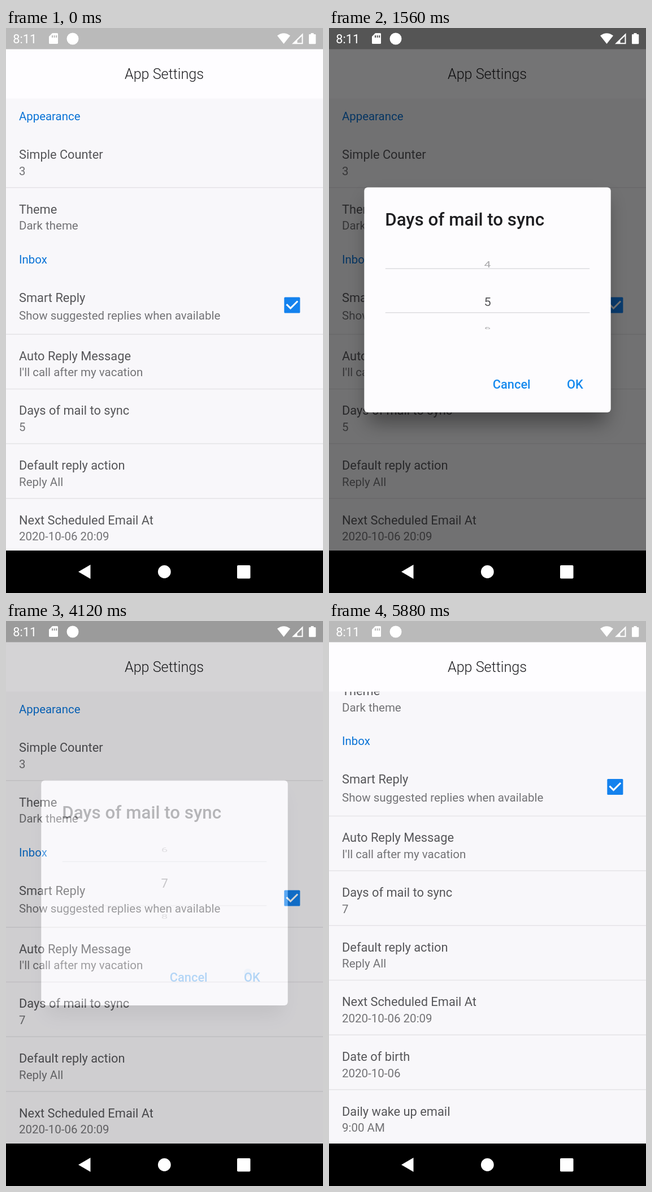
Recreate the animation shown at these times as an HTML page. Size 561 px wide and 998 px high, loop 6 s.

```html
<!DOCTYPE html>
<html lang="en">
<head>
<meta charset="utf-8">
<title>App Settings</title>
<style>
html, body { margin: 0; width: 100%; height: 100%; overflow: hidden; background: #000; }
svg { display: block; width: 100vw; height: 100vh; font-family: Roboto, "Open Sans", sans-serif; }
.name { font-size: 21.82px; fill: #565659; }
.value { font-size: 20.5px; fill: #737376; }
.section { font-size: 20.4px; fill: #0a73d6; }
.button { font-size: 21.82px; font-weight: 500; fill: #168aee; }
.digit { font-size: 21.82px; fill: #555558; text-anchor: middle; }
</style>
</head>
<body>
<svg viewBox="0 0 561 998" xmlns="http://www.w3.org/2000/svg">
  <defs>
    <clipPath id="listClip"><rect y="124.7" width="561" height="798.3"/></clipPath>
    <clipPath id="wheelClip"><rect x="100" y="389" width="361" height="149.5"/></clipPath>
    <filter id="blur" x="-30%" y="-30%" width="160%" height="160%"><feGaussianBlur stdDeviation="17"/></filter>
  </defs>

  <rect width="561" height="923" fill="#f8f7fa"/>
  <g clip-path="url(#listClip)">
    <g id="list"></g>
    <circle id="glow" cx="280.5" r="841" fill="#1482ee"/>
  </g>
  <rect y="37.4" width="561" height="87.3" fill="#fefdff"/>
  <text x="280" y="90" text-anchor="middle" font-size="25.2" font-weight="300" fill="#1f1f22">App Settings</text>
  <rect width="561" height="37.4" fill="#bababa"/>

  <g id="dialog">
    <rect width="561" height="923" fill="#000" opacity=".54"/>
    <rect x="70" y="303" width="421" height="394" rx="6" opacity=".38" filter="url(#blur)"/>
    <rect x="62.3" y="281.4" width="436.4" height="397.6" rx="6.2" fill="#fdfcfe"/>
    <text x="99.2" y="348.5" font-size="31.3" font-weight="500" fill="#1f1f22">Days of mail to sync</text>
    <g id="wheel" clip-path="url(#wheelClip)"></g>
    <path d="M99.7 425H461.3M99.7 502.8H461.3" stroke="#dddde0" stroke-width="1.6"/>
    <circle id="press" cx="428" cy="621" fill="#1482ee" opacity=".14"/>
    <text class="button" x="289.8" y="637.2">Cancel</text>
    <text class="button" x="421" y="637.2">OK</text>
  </g>

  <g fill="#fff">
    <text x="12.3" y="27.2" font-size="21.82">8:11</text>
    <path fill-rule="evenodd" d="M82 9H90.5Q92 9 92 10.500V26.500Q92 28 90.500 28H77.500Q76 28 76 26.500V15ZM81 13V17H83V13ZM84.600 13V17H86.600V13ZM88.200 13V17H90.200V13Z"/>
    <circle cx="118" cy="19" r="10.5"/>
    <path d="M480 13.500Q491.500 4.800 503 13.500L491.500 28Z"/>
    <path fill-rule="evenodd" d="M506 28.200L525.500 9V28.200ZM515.500 26.200H523.500V14.500L515.500 22Z"/>
    <path d="M539.500 9H544.500V11H547Q548.300 11 548.300 12.300V27Q548.300 28.300 547 28.300H537.300Q536 28.300 536 27V12.300Q536 11 537.300 11H539.500Z"/>
  </g>

  <rect y="923" width="561" height="75"/>
  <g fill="#fff">
    <path d="M128 960.500L149.500 948V973Z"/>
    <circle cx="280.3" cy="960.500" r="11.4"/>
    <rect x="409" y="949" width="23.500" height="23.500" rx="1.800"/>
  </g>
</svg>

<script>
const LOOP = 6000, STEP = 40;
const SCROLL_END = 196.5;
const WHEEL = { x: 280.5, y: 463.7, radius: 68.5, angle: 59.5 * Math.PI / 180 };

const $ = id => document.getElementById(id);
const clamp = v => Math.max(0, Math.min(1, v));
const progress = (t, from, to) => clamp((t - from) / (to - from));
const easeOut = (p, power) => 1 - Math.pow(1 - p, power);

function add(parent, tag, attrs, text = "") {
  const el = document.createElementNS("http://www.w3.org/2000/svg", tag);
  for (const key in attrs) el.setAttribute(key, attrs[key]);
  el.textContent = text;
  return parent.appendChild(el);
}
const set = (el, attrs) => { for (const key in attrs) el.setAttribute(key, attrs[key]); };

const list = $("list");
const label = (cls, y, text) => add(list, "text", { class: cls, x: 23, y }, text);
const divider = y => add(list, "rect", { y: y - 0.8, width: 561, height: 1.6, fill: "#e6e5e8" });

// The touch mark lies under the text of its row.
const touch = add(list, "circle", { cx: 300, cy: 662.3 });

function row(y, name, value, gap = 28.6) {
  label("name", y, name);
  return label("value", y + gap, value);
}

label("section", 163.3, "Appearance");
row(230.9, "Simple Counter", "3");
row(327.7, "Theme", "Dark theme");
label("section", 415.7, "Inbox");
row(483.7, "Smart Reply", "Show suggested replies when available", 31.4);
add(list, "rect", { x: 492.3, y: 475.5, width: 28.1, height: 28.1, rx: 1.6, fill: "#1482ee" });
add(list, "path", { d: "M496.500 488.100L503.500 495.100L516.100 482.500", fill: "none", stroke: "#fff", "stroke-width": 3.1 });

const rows = [
  ["Auto Reply Message", "I'll call after my vacation"],
  ["Days of mail to sync", "5"],
  ["Default reply action", "Reply All"],
  ["Next Scheduled Email At", "2020-10-06 20:09"],
  ["Date of birth", "2020-10-06"],
  ["Daily wake up email", "9:00 AM"]
].map(([name, value], i) => {
  const top = 541 + i * 96.65;
  divider(top);
  return row(top + 45.8, name, value);
});
divider(281.8);
const daysValue = rows[1];

const digits = [];
for (let n = 2; n <= 9; n++) {
  digits.push({ n, el: add($("wheel"), "text", { class: "digit", y: 7.7 }, n) });
}

function wheelPosition(t) {
  return 5
    - easeOut(progress(t, 880, 1240), 2.6)
    + easeOut(progress(t, 1400, 1920), 3.4)
    + easeOut(progress(t, 2240, 2480), 2.4)
    + easeOut(progress(t, 2760, 3040), 2.4);
}

function drawWheel(t) {
  const pos = wheelPosition(t);
  for (const { n, el } of digits) {
    const a = (n - pos) * WHEEL.angle;
    const shown = Math.abs(a) < 1.53;
    el.style.display = shown ? "" : "none";
    if (!shown) continue;
    const dy = WHEEL.radius * Math.sin(a);
    const s = 1 / (1 + 0.144 * (1 - Math.cos(a)));
    set(el, {
      transform: `translate(${WHEEL.x} ${WHEEL.y + dy}) scale(${s} ${s * Math.cos(a)})`,
      opacity: 1 - 0.5 * progress(Math.abs(dy), 27, 42)
    });
  }
}

function dialogOpacity(t) {
  if (t < 4120) return easeOut(progress(t, 0, 120), 3.2);
  return t < 4160 ? 0.3 : 0;
}

function render(t) {
  const opacity = dialogOpacity(t);
  $("dialog").style.display = opacity ? "" : "none";
  set($("dialog"), { opacity });
  drawWheel(t);
  set($("press"), { r: t < 3920 ? 0 : 2 + 5 * progress(t, 3920, 4080) });

  const value = t < 4080 ? "5" : "7";
  if (daysValue.textContent !== value) daysValue.textContent = value;

  const scroll = SCROLL_END * easeOut(progress(t, 4880, 5280), 1.61);
  set(list, { transform: `translate(0 ${-scroll})` });
  set(touch, {
    r: t < 4880 ? 0 : 12 + 8.5 * progress(t, 4880, 4960),
    opacity: 0.066 * (1 - progress(t, 4960, 5120))
  });

  const pull = Math.sin(Math.PI * progress(t, 5400, 5680));
  set($("glow"), { cy: 923 + 841 - 82 * pull, opacity: 0.15 * pull });
}

const start = performance.now();
function tick() {
  const t = (performance.now() - start) % LOOP;
  render(Math.floor(t / STEP) * STEP);
  requestAnimationFrame(tick);
}
tick();
</script>
</body>
</html>
```
